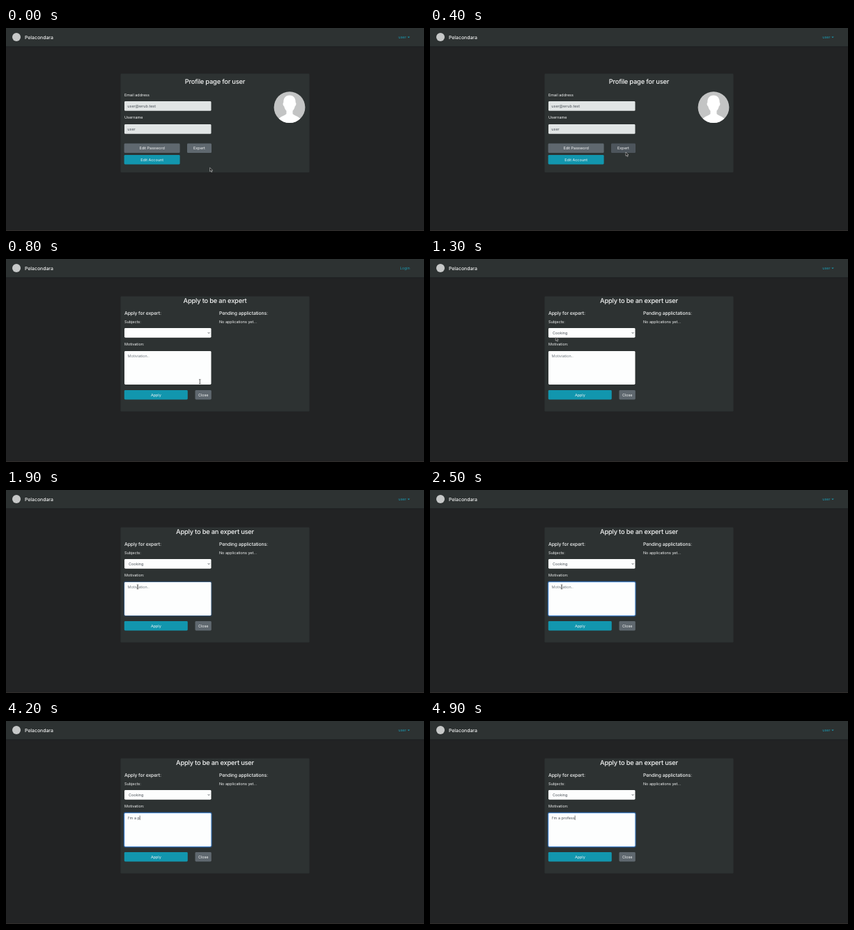
Animation, 600 px wide and 291 px high, one loop 5000 ms. Source, as an HTML page:

```html
<!DOCTYPE html>
<html lang="en">
<head>
<meta charset="utf-8">
<title>Expert application</title>
<style>
  html, body { margin: 0; width: 100%; height: 100%; overflow: hidden; background: #222324; }
  svg { display: block; width: 100%; height: 100%; }
  text {
    font: 400 5.45px Inter, "Open Sans", sans-serif;
    fill: #f5f6f6;
    white-space: pre;
    text-rendering: geometricPrecision;
  }
  .mid { text-anchor: middle; }
  .brand { font-size: 6.85px; font-weight: 500; }
  .title { font-size: 9.3px; font-weight: 500; letter-spacing: -.2px; text-anchor: middle; }
  .head { font-size: 6.8px; font-weight: 500; letter-spacing: -.1px; }
  .link { fill: #1b9ab2; }
  .dark { fill: #495057; }
  .hint { fill: #727a81; }
  .status { font-size: 4.5px; fill: #7b7d7f; }
  .panel { fill: #2d3232; }
  .readonly { fill: #e1e5e5; }
  .field { fill: #fdfefe; }
  .info { fill: #1296ae; }
  .grey { fill: #5f686f; }
</style>
</head>
<body>
<svg viewBox="0 0 600 291" preserveAspectRatio="none">
  <defs>
    <clipPath id="round"><circle cx="407" cy="113.7" r="22.4"/></clipPath>
  </defs>

  <rect width="600" height="291" fill="#222324"/>
  <rect y="26" width="600" height="1.2" fill="#1c1d1e"/>
  <rect class="panel" width="600" height="26.3"/>
  <rect y="290.2" width="600" height=".8" fill="#36332f"/>
  <circle cx="15" cy="13" r="6" fill="#c6c8c8"/>
  <text class="brand" x="27" y="15.6">Pelacondara</text>
  <g id="account">
    <text class="link" x="563.2" y="15.3">user</text>
    <path class="link" d="M576.3 12.4h3.4l-1.7 1.8z"/>
  </g>
  <text id="login" class="link" x="565.5" y="15.3">Login</text>

  <g id="profile">
    <rect class="panel" x="164.5" y="65.5" width="271" height="141.5" rx="1.2"/>
    <text class="title" x="300" y="80.2">Profile page for user</text>
    <text x="170" y="97.8">Email address</text>
    <rect class="readonly" x="170" y="105" width="124.5" height="13.8" rx="1.4"/>
    <text class="dark" x="174.3" y="113.9">user@wrub.test</text>
    <text x="170" y="130.4">Username</text>
    <rect class="readonly" x="170" y="138" width="124.5" height="13.8" rx="1.4"/>
    <text class="dark" x="174.3" y="146.9">user</text>
    <rect class="grey" x="169.6" y="165.5" width="80" height="13.6" rx="1.4"/>
    <text class="mid" x="209.6" y="174.4">Edit Password</text>
    <rect id="expert" class="grey" x="260" y="165.5" width="35" height="13.6" rx="1.4"/>
    <text class="mid" x="277.4" y="174.4">Expert</text>
    <rect class="info" x="169.6" y="181.9" width="80" height="13.6" rx="1.4"/>
    <text class="mid" x="209.6" y="190.8">Edit Account</text>
    <circle cx="407" cy="113.7" r="22.4" fill="#c3c4c4"/>
    <path clip-path="url(#round)" fill="#fff" d="M407 96.5c6 0 9 4.500 8.700 10.500
      c1.300.5.8 4.300-.9 5.200c-.6 3-1.800 5-3.300 6.500v4.300c2 3 12 3.500 14 13H388.500
      c2-9.500 12-10 14-13v-4.300c-1.500-1.500-2.700-3.500-3.300-6.500c-1.700-.9-2.200-4.700-.9-5.200
      C398 101 401 96.500 407 96.500z"/>
  </g>

  <g id="apply">
    <rect class="panel" x="164.5" y="53.5" width="271" height="165" rx="1.2"/>
    <text id="title" class="title" x="300" y="63"></text>
    <text class="head" x="170" y="80.3">Apply for expert:</text>
    <text class="head" x="306" y="80.3">Pending applictations:</text>
    <text x="170" y="91.6">Subjects:</text>
    <text x="306" y="91.6">No applications yet...</text>
    <rect class="field" x="170" y="99" width="124.5" height="13.7" rx="1.4"/>
    <text id="subject" class="dark" x="176" y="107.9">Cooking</text>
    <path d="M289.800 105.200l1.300 1.400l1.300-1.400" fill="none" stroke="#343a40" stroke-width=".8"/>
    <text x="170" y="124.300">Motivation:</text>
    <rect id="ring" x="169.400" y="131.400" width="125.700" height="49.200" rx="1.800"
      fill="none" stroke="#2b6fc0" stroke-width="1.200"/>
    <rect class="field" x="170" y="132" width="124.500" height="48" rx="1.400"/>
    <rect id="edge" x="170.200" y="132.200" width="124.100" height="47.600" rx="1.300"
      fill="none" stroke="#80bdff" stroke-width=".5"/>
    <text id="hint" class="hint" x="174.500" y="140.900">Motiviation..</text>
    <text id="typed" class="dark" x="174.500" y="140.900"></text>
    <rect id="caret" y="135.600" width=".6" height="6.400" fill="#222"/>
    <rect class="info" x="169.800" y="188" width="91" height="13.500" rx="1.400"/>
    <text class="mid" x="215.300" y="196.800">Apply</text>
    <rect class="grey" x="271.500" y="188" width="23.300" height="13.500" rx="1.400"/>
    <text class="mid" x="283.200" y="196.800">Close</text>
  </g>

  <g id="status">
    <rect y="284" width="71" height="7" rx="1" fill="#303234"/>
    <text class="status" x="1.500" y="289.200">innerhost.test/becomeSpecialists</text>
  </g>

  <path id="arrow" d="M0 0v5.400l1.300-1.100l.9 2.100l1-.4l-.9-2.100h1.700z"
    fill="#111" stroke="#eee" stroke-width=".5"/>
  <path id="beam" d="M-1.200-3.100q1.200 0 1.200.8v4.600q0 .8-1.200.8M1.200-3.100q-1.200 0-1.200.8M1.200 3.100q-1.200 0-1.200-.8"
    fill="none" stroke="#222" stroke-width=".7"/>
</svg>
<script>
  const LOOP = 5000, STEP = 100;
  const $ = id => document.getElementById(id);
  const show = (id, on) => { $(id).style.display = on ? '' : 'none'; };

  // Pointer path: time, x, y
  const path = [
    [0, 292.6, 200.2], [200, 288.500, 192], [400, 281, 178], [600, 278.300, 175.500], [800, 278.300, 175.700],
    [900, 258, 157], [1100, 193, 112], [1300, 180.300, 111.800],
    [1600, 195, 130], [1800, 189, 138.900], [LOOP, 189, 138.900]
  ];

  // Moments at which the next characters are typed
  const keys = [
    [3100, 'I'], [3500, "'"], [3600, 'm'], [3700, ' '], [3800, 'a'], [3900, ' '],
    [4200, 'p'], [4300, 'r'], [4400, 'o'], [4600, 'f'], [4800, 'e'], [4900, 'ss']
  ];

  function pointerAt(t) {
    const i = path.findIndex(p => p[0] > t);
    const [t0, x0, y0] = path[i - 1], [t1, x1, y1] = path[i];
    const k = (t - t0) / (t1 - t0);
    return [x0 + (x1 - x0) * k, y0 + (y1 - y0) * k];
  }

  function drawPointer(t) {
    const [x, y] = pointerAt(t);
    const beam = t === 800 || t === 900 || y > 132 && t > 1300;
    const live = t < 3100;
    show('arrow', live && !beam);
    show('beam', live && beam);
    $(beam ? 'beam' : 'arrow').setAttribute('transform', `translate(${x} ${y})`);
  }

  function drawExpert(t) {
    const grow = t >= 700 ? 1 : 0;
    const btn = $('expert');
    btn.style.fill = t >= 400 ? '#4d555c' : '';
    btn.style.stroke = grow ? '#484f55' : 'none';
    btn.style.strokeWidth = 2 * grow;
  }

  function drawMotivation(t) {
    const focus = Math.min(1, Math.max(0, (t - 1800) / 250));
    $('ring').style.opacity = focus * .75;
    $('edge').style.opacity = focus;
    const text = keys.filter(k => k[0] <= t).map(k => k[1]).join('');
    $('typed').textContent = text;
    show('hint', !text);
    show('caret', t >= 2000 && (t < 2500 || t >= 3000));
    const width = text ? $('typed').getComputedTextLength() : 0;
    $('caret').setAttribute('x', 174.500 + width);
  }

  function draw(time) {
    const t = Math.floor(time % LOOP / STEP) * STEP;
    const applying = t >= 800, signedIn = t !== 800;
    show('profile', !applying);
    show('apply', applying);
    show('account', signedIn);
    show('login', !signedIn);
    show('status', t >= 500 && t < 800);
    show('subject', t >= 1200);
    $('title').textContent = 'Apply to be an expert' + (signedIn ? ' user' : '');
    drawExpert(t);
    if (applying) drawMotivation(t);
    drawPointer(t);
  }

  const start = performance.now();
  function tick() {
    draw(performance.now() - start);
    requestAnimationFrame(tick);
  }
  tick();
</script>
</body>
</html>
```
